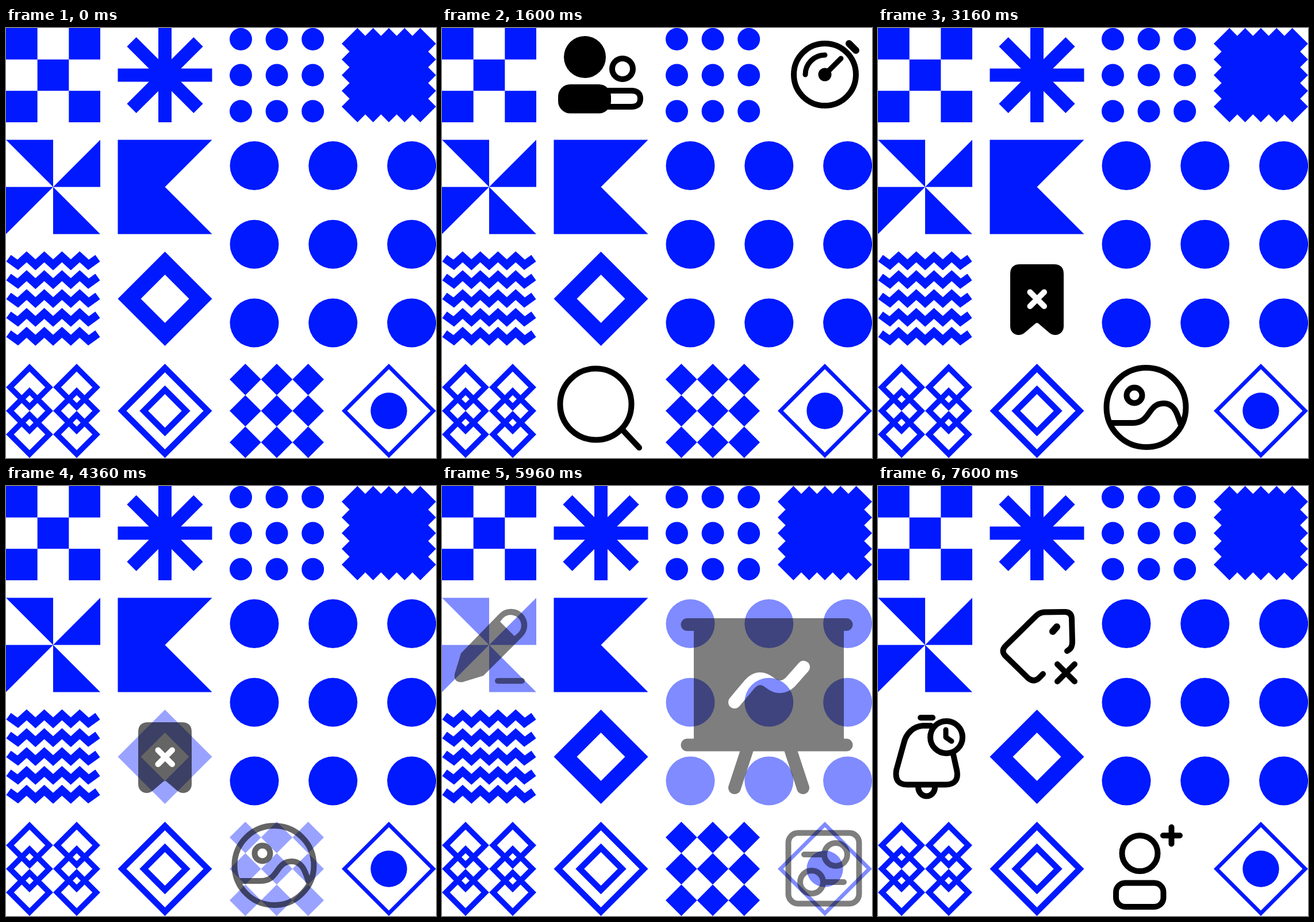
An HTML page for the animation above (8 s loop, 748 by 748 pixels).

```html
<!DOCTYPE html>
<html lang="en">
<head>
<meta charset="utf-8">
<title>Pattern and icon grid</title>
<style>
@property --a { syntax: "<number>"; inherits: true; initial-value: 0 }
@property --b { syntax: "<number>"; inherits: true; initial-value: 0 }
@property --c { syntax: "<number>"; inherits: true; initial-value: 0 }
@property --d { syntax: "<number>"; inherits: true; initial-value: 0 }
@property --e { syntax: "<number>"; inherits: true; initial-value: 0 }

html, body { margin: 0; width: 100%; height: 100%; overflow: hidden; background: #fff }
svg {
  display: block; width: 100%; height: 100%;
  animation: 8s step-end infinite;
  animation-name: setA, setB, setC, setD, setE;
}

/* Each set of icons fades in 40 ms steps while its patterns fade the other way. */
@keyframes setA { 0% { --a: 0 } .5% { --a: .5 } 1% { --a: 1 } 18% { --a: .7 } 18.5% { --a: .3 } 19%, 100% { --a: 0 } }
@keyframes setB { 0% { --b: 0 } 19.5% { --b: .5 } 20% { --b: 1 } 36.5% { --b: .87 } 37% { --b: .53 } 37.5% { --b: .2 } 38%, 100% { --b: 0 } }
@keyframes setC { 0% { --c: 0 } 38.5% { --c: .33 } 39% { --c: .67 } 39.5% { --c: 1 } 54.5% { --c: .6 } 55% { --c: .2 } 55.5%, 100% { --c: 0 } }
@keyframes setD { 0% { --d: 0 } 57% { --d: .5 } 57.5% { --d: 1 } 74.5% { --d: .5 } 75% { --d: .12 } 75.5%, 100% { --d: 0 } }
@keyframes setE { 0% { --e: 0 } 94% { --e: .25 } 94.5% { --e: .6 } 95%, 100% { --e: 1 } }

#patterns { fill: #0019ff; stroke: none }
.line { fill: none; stroke-linecap: round; stroke-linejoin: round; stroke: #000; stroke-width: 10 }
#patterns .band { fill: none; stroke: #0019ff }
mask .line { stroke: #000 }
.a { opacity: var(--a) }
.b { opacity: var(--b) }
.c { opacity: var(--c) }
.d { opacity: var(--d) }
.e { opacity: var(--e) }
</style>
</head>
<body>
<svg viewBox="0 0 748 748">
  <defs>
    <mask id="binHole" maskUnits="userSpaceOnUse" x="0" y="0" width="748" height="748">
      <path fill="#fff" d="M0 0H748V748H0z"/>
      <path class="line" d="M61 91L63.500 114M84 91V118M107.500 91L105 114"/>
    </mask>
    <mask id="alarmHole" maskUnits="userSpaceOnUse" x="0" y="0" width="748" height="748">
      <path fill="#fff" d="M0 0H748V748H0z"/>
      <path class="line" stroke-width="11" d="M470.500 56V91"/>
      <circle cx="470.500" cy="112" r="7.500"/>
    </mask>
    <mask id="markHole" maskUnits="userSpaceOnUse" x="0" y="0" width="748" height="748">
      <path fill="#fff" d="M0 0H748V748H0z"/>
      <path class="line" d="M264.500 459.500l24.500 24.500m0-24.500l-24.500 24.500"/>
    </mask>
    <mask id="boardHole" maskUnits="userSpaceOnUse" x="0" y="0" width="748" height="748">
      <path fill="#fff" d="M0 0H748V748H0z"/>
      <path class="line" style="stroke-width:22" d="M509 376L535 345Q551 327 570 342T606 341L629 315"/>
    </mask>
  </defs>

  <g id="patterns"></g>

  <!-- bin, alarm, bolt -->
  <g class="a">
    <path mask="url(#binHole)" d="M31 50L37 145Q38 158 51 158H117Q130 158 131 145L137 50z"/>
    <rect class="line" style="fill:#fff" x="29" y="32" width="109" height="20" rx="10"/>
    <path class="line" d="M73 30V26a11 11 0 0 1 22 0V30"/>
    <circle mask="url(#alarmHole)" cx="470.500" cy="84" r="74.500"/>
    <path class="line" style="stroke-width:11" d="M402 29L415 16M526 16L539 29"/>
    <path class="line" style="stroke-width:11" d="M80 607Q91 598 91 612V638Q91 647 100 647H124Q138 649 129 662L92 715Q80 726 80 712V682Q80 672 70 672H49Q36 668 45 654z"/>
  </g>

  <!-- people, stopwatch, magnifier -->
  <g class="b">
    <circle cx="248.500" cy="50.500" r="36.500"/>
    <rect x="202" y="98" width="92" height="50.500" rx="21"/>
    <circle class="line" cx="314" cy="71" r="18"/>
    <path class="line" d="M290 109H329Q345 109 345 123Q345 137 329 137H290"/>
    <circle class="line" cx="666" cy="81" r="54"/>
    <path class="line" style="stroke-width:12" d="M708 27L720 39"/>
    <circle cx="666" cy="81" r="11.500"/>
    <path class="line" style="stroke-width:9" d="M666 81L694 53M632 81A34 34 0 0 1 666 47"/>
    <circle class="line" cx="267.500" cy="654.500" r="62"/>
    <path class="line" d="M314 699L343 730"/>
  </g>

  <!-- bookmark, picture -->
  <g class="c">
    <path mask="url(#markHole)" d="M247 411H306Q323 411 323 428V519C323 532 309 538 299 531L279 514Q276.500 512 274 514L254 531C244 538 230 532 230 519V428Q230 411 247 411z"/>
    <circle class="line" cx="466.500" cy="660" r="69"/>
    <circle class="line" cx="446" cy="639" r="13.500"/>
    <path class="line" d="M405 687H444C474 687 469 653 497 653C516 653 521 672 526 688"/>
  </g>

  <!-- pen, board, sliders -->
  <g class="d">
    <path fill-rule="evenodd" d="M100 222A28 28 0 0 1 140 262L72 330L36 341Q20 343 22 327L33 291zM101 236L126 261L133 255A18.400 18.400 0 0 0 107 229z"/>
    <path class="line" d="M97 339H139"/>
    <path mask="url(#boardHole)" d="M438 230H699V461H438z"/>
    <path class="line" style="stroke-width:22" d="M426.500 241H438M699 241H703.500M426.500 450.500H438M699 450.500H703.500M438 241H699M438 450.500H699M532 455L509 525M605 455L628 525"/>
    <rect class="line" x="602.500" y="603.500" width="123" height="123" rx="17"/>
    <circle class="line" cx="685" cy="641" r="20"/>
    <circle class="line" cx="643" cy="689" r="20"/>
    <path class="line" d="M630 641H662M666 689H699"/>
  </g>

  <!-- tag, bell, new user -->
  <g class="e">
    <path class="line" d="M329 287C336 283 338 279 338 270L337 230Q336 219 325 219L289 219.500Q281 220 275 226L222 278Q213 287 222 296L261 334Q270 342 279 335L287 327M312 310l30 30m0-30l-30 30"/>
    <path class="line" style="stroke-width:12" d="M304 253L311 245"/>
    <path class="line" d="M74 403H95M92 417H78C62 418 49 430 45 447L32 494Q28 519 50 519.500H118Q142 519 137 494L131 467M70 524a14.500 15.500 0 0 0 29 0"/>
    <circle class="line" cx="119" cy="437" r="28"/>
    <path class="line" style="stroke-width:9" d="M118 424V437L128 444"/>
    <circle class="line" cx="455.500" cy="639" r="31"/>
    <rect class="line" x="414" y="690.500" width="82.500" height="41.500" rx="16"/>
    <path class="line" d="M496 608H525M510.500 593.500V622.500"/>
  </g>
</svg>
<script>
const size = 164, mid = 82, third = size / 3, half = size / 6;
const xs = [0, 194.5, 389, 584];
const root = document.getElementById('patterns');

const diamond = (x, y, r) => `M${x} ${y - r}l${r} ${r} ${-r} ${r} ${-r} ${-r}z`;
const disc = (x, y, r) => `M${x - r} ${y}a${r} ${r} 0 1 0 ${2 * r} 0a${r} ${r} 0 1 0 ${-2 * r} 0z`;
const square = (x, y) => `M${x} ${y}h${third}v${third}h${-third}z`;
const grid = (first, step, draw) => [0, 1, 2].flatMap(i =>
  [0, 1, 2].map(j => draw(first + i * step, first + j * step))).join('');

function add(col, row, sets, d, band) {
  const p = document.createElementNS('http://www.w3.org/2000/svg', 'path');
  p.setAttribute('d', d);
  p.setAttribute('transform', `translate(${xs[col]} ${xs[row]})`);
  if (band) {
    p.setAttribute('class', 'band');
    p.setAttribute('stroke-width', band);
  } else p.setAttribute('fill-rule', 'evenodd');
  p.style.opacity = `calc(1 - ${[...sets].map(s => `var(--${s})`).join(' - ')})`;
  root.append(p);
}

// top row
add(0, 0, 'a', [[0, 0], [2, 0], [1, 1], [0, 2], [2, 2]].map(([x, y]) => square(x * third, y * third)).join(''));
const arm = mid * Math.SQRT1_2, lo = mid - arm, hi = mid + arm;
add(1, 0, 'b', `M82 0V164M0 82H164M${lo} ${lo}L${hi} ${hi}M${lo} ${hi}L${hi} ${lo}`, 23);
add(2, 0, 'a', grid(19.5, 62.6, (x, y) => disc(x, y, 19.5)));
const n = half / 2;
const edge = (x, y, u, v) => `l${x * half} ${y * half}` + `l${u * n} ${v * n} ${u ** 2 * x * n} ${v ** 2 * y * n}`.repeat(0);
const teeth = (dx1, dy1, dx2, dy2) => `l${dx1 * n} ${dy1 * n} ${dx2 * n} ${dy2 * n}`.repeat(4);
add(3, 0, 'b', `M0 ${half}` +
  edge(1, -1, 0, 0) + teeth(1, 1, 1, -1) +
  edge(1, 1, 0, 0) + teeth(-1, 1, 1, 1) +
  edge(-1, 1, 0, 0) + teeth(-1, -1, -1, 1) +
  edge(-1, -1, 0, 0) + teeth(1, -1, -1, -1) + 'z');

// second row
add(0, 1, 'd', 'M0 0H82V82zM164 0V82H82zM82 82L164 164H82zM0 82H82L0 164z');
add(1, 1, 'e', 'M0 0H164L82 82L164 164H0z');
add(2, 1, 'd', grid(0, 136.8, (x, y) => disc(x + 43, y + 45, 42.5)));

// third row
let waves = '';
for (let r = 0; r < 5; r++) {
  const y = r * 32.8;
  waves += `M4.5 ${11.5 + y}`;
  for (let i = 0; i < 9; i++) waves += `L${20.5 + i * 15.38} ${(i % 2 ? 9 : 23) + y}`;
  waves += `L159.5 ${11.5 + y}`;
}
add(0, 2, 'e', waves, 14);
add(1, 2, 'c', diamond(82, 82, 82) + diamond(82, 82, 42));

// bottom row
add(0, 3, 'a', [41, 123].flatMap(x => [41, 82, 123].map(y => diamond(x, y, 34.2))).join(''), 9.6);
add(1, 3, 'b', diamond(82, 82, 74.5) + diamond(82, 82, 36.7), 10.6);
add(2, 3, 'ce', grid(half, third, (x, y) => diamond(x, y, half)));
add(3, 3, 'd', diamond(82, 82, 82) + diamond(82, 82, 72.5) + disc(82, 82, 31.7));
</script>
</body>
</html>
```
